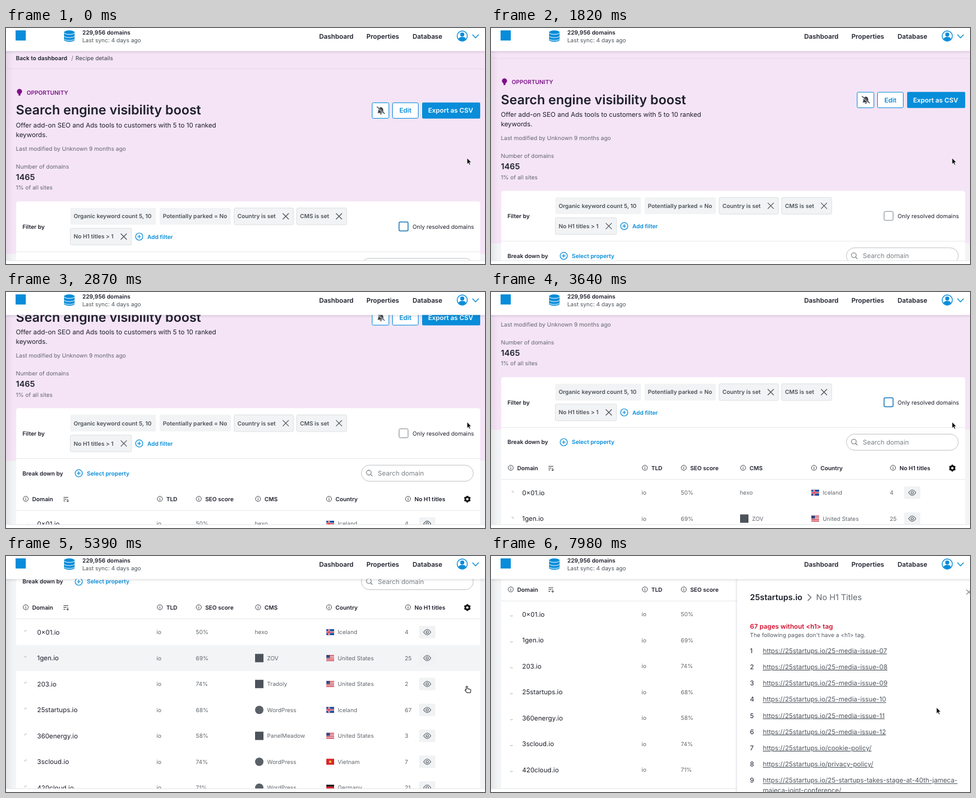
Recreate the animation shown at these times as an HTML page. Size 800 by 396 pixels, loop 8000 ms.

```html
<!DOCTYPE html>
<html lang="en">
<head>
<meta charset="utf-8">
<title>Domain dashboard</title>
<style>
  html, body { margin: 0; width: 100%; height: 100%; overflow: hidden; background: #f3f4f5; }
  svg { display: block; width: 100vw; height: 100vh; }
  text { font-family: Inter, Roboto, sans-serif; font-optical-sizing: none; text-rendering: geometricPrecision; white-space: pre; }
</style>
</head>
<body>
<svg id="stage" viewBox="0 0 800 396"></svg>
<script>
const LOOP = 8000, STEP = 70;
const BLUE = '#078dd9', INK = '#1d1f2b', GRAY = '#62676d', DIM = '#555b62', PURPLE = '#7d0f88';
const SMALL = 9.5, BODY = 10.88, LARGE = 13.55, TITLE = 21.75;
const ROW_TOP = 463, ROW_H = 43.5;

// Text is placed by the vertical middle of its capitals.
const text = (x, y, s, { size = SMALL, fill = INK, bold = false, extra = '' } = {}) =>
  `<text x="${x}" y="${y + size * 0.364}" font-size="${size}" fill="${fill}" font-weight="${bold ? 600 : 400}" ${extra}>${s}</text>`;
const rect = (x, y, w, h, fill, extra = '') =>
  `<rect x="${x}" y="${y}" width="${w}" height="${h}" fill="${fill}" ${extra}/>`;
const line = (d, stroke, width = 1, extra = '') =>
  `<path d="${d}" fill="none" stroke="${stroke}" stroke-width="${width}" ${extra}/>`;
const circle = (x, y, r, fill, extra = '') =>
  `<circle cx="${x}" cy="${y}" r="${r}" fill="${fill}" ${extra}/>`;
const ring = (x, y, r, stroke, width = 1) =>
  circle(x, y, r, 'none', `stroke="${stroke}" stroke-width="${width}"`);
const at = (x, y, body, id = '') => `<g ${id && `id="${id}"`} transform="translate(${x} ${y})">${body}</g>`;

const cross = (x, y, r = 5, color = '#4d5258') =>
  line(`M${x - r} ${y - r}l${2 * r} ${2 * r}M${x + r} ${y - r}l${-2 * r} ${2 * r}`, color, 1.1);
const plus = (x, y) => ring(x, y, 6, BLUE, 1.2) + line(`M${x - 3} ${y}h6M${x} ${y - 3}v6`, BLUE, 1.2);
const info = (x, y) => ring(x, y, 4.2, '#33373d', 0.9) + line(`M${x} ${y - 2.2}v1M${x} ${y - 0.5}v2.8`, '#33373d', 1);
const chip = (x, y, w, label, closable) =>
  rect(x, y, w, 28, '#f1f3f4', `rx="2" ${closable ? 'stroke="#dde0e3"' : ''}`) +
  text(x + 5.5, y + 14, label, { fill: '#4c5259', bold: true }) +
  (closable ? cross(x + w - 12.8, y + 14) : '');
const eye = (x, y) => rect(x - 13.5, y - 10.5, 27, 21, '#f0f2f4', 'rx="2"') +
  line(`M${x - 6} ${y}q6 -9 12 0q-6 9 -12 0z`, '#5b6168', 1.1) + ring(x, y, 2, '#5b6168', 1.1);

const flags = {
  'Iceland': rect(0, 0, 13, 10, '#174a9c') + line('M0 5h13M4.5 0v10', '#fff', 3) + line('M0 5h13M4.5 0v10', '#d9263a', 1.5),
  'United States': rect(0, 0, 13, 10, '#f6eaec') + line('M0 .7h13M0 3.6h13M0 6.5h13M0 9.3h13', '#cf3a4b', 1.4) + rect(0, 0, 6, 5, '#39477f'),
  'Vietnam': rect(0, 0, 13, 10, '#d8242c') + '<path d="M6.5 2l.8 2h2.1l-1.7 1.3.7 2.2-1.9-1.3-1.9 1.3.7-2.2L3.6 4h2.1z" fill="#ffde2e"/>',
  'Germany': rect(0, 0, 13, 3.4, '#1c1c1c') + rect(0, 3.4, 13, 3.3, '#d8202a') + rect(0, 6.7, 13, 3.3, '#f4c51c')
};
const square = rect(416, -7, 14, 14, '#4d535a');
const disc = circle(423, 0, 7, '#5a6067');
const cmsMarks = { ZOV: square, Tradoly: square, PanelMeadow: square, WordPress: disc };

const rows = [
  ['0×01.io', 50, 'hexo', 'Iceland', 4],
  ['1gen.io', 69, 'ZOV', 'United States', 25],
  ['203.io', 74, 'Tradoly', 'United States', 2],
  ['25startups.io', 68, 'WordPress', 'Iceland', 67],
  ['360energy.io', 58, 'PanelMeadow', 'United States', 3],
  ['3scloud.io', 74, 'WordPress', 'Vietnam', 7],
  ['420cloud.io', 71, 'WordPress', 'Germany', 21]
];

function tableRow([domain, score, cms, country, count], i) {
  const dim = { fill: GRAY };
  return at(0, ROW_TOP + (i + 0.5) * ROW_H,
    `<path class="spinner" d="M0 -3A3 3 0 0 1 3 0" fill="none" stroke="#b3b7bb"/>` +
    text(52, 0, domain, { size: BODY }) +
    text(251.5, 0, 'io', dim) + text(317, 0, score + '%', dim) +
    (cmsMarks[cms] || '') + text(cmsMarks[cms] ? 436 : 415.5, 0, cms, dim) +
    at(535, -5, flags[country]) + text(554, 0, country, dim) +
    text(666, 0, count, dim) + eye(703.5, 0));
}

function header() {
  const nav = { size: BODY, bold: true };
  return rect(0, -10, 800, 48.5, '#fff', 'filter="url(#soft)"') +
    rect(16, 4, 17, 17, BLUE) +
    `<path d="M97 7v13c0 4 17.500 4 17.500 0V7z" fill="${BLUE}"/><ellipse cx="105.750" cy="7" rx="8.750" ry="3" fill="${BLUE}"/>` +
    line('M97 8c1 3.500 16.500 3.500 17.500 0M97 13.500c1 3.500 16.500 3.500 17.500 0M97 18.500c1 3 16.500 3 17.500 0', '#fff', 1) +
    text(127.5, 7.3, '229,956 domains', { bold: true }) +
    text(127.5, 20.8, 'Last sync: 4 days ago', { fill: '#4d5359' }) +
    text(523, 14, 'Dashboard', nav) + text(602, 14, 'Properties', nav) + text(679, 14, 'Database', nav) +
    ring(762, 13.5, 8.5, BLUE, 1.4) + circle(762, 11, 3.4, BLUE) +
    `<path d="M756 19q0 -4 6 -4t6 4q-6 5 -12 0z" fill="${BLUE}"/>` +
    line('M779 11l5.200 5.500 5.200 -5.500', BLUE, 1.3);
}

function intro() {
  const outlined = `rx="2" stroke="${BLUE}"`;
  return rect(0, -60, 800, 439, '#f5e4f6') + line('M0 68.500H800', '#e9d8eb') +
    text(16.5, 50.7, 'Back to dashboard', { bold: true }) + text(109, 50.7, '/', { fill: GRAY }) + text(116, 50.7, 'Recipe details', { fill: '#3b3f48' }) +
    circle(22.5, 106.5, 4.3, PURPLE) + rect(20.8, 109, 3.4, 4.5, PURPLE, 'rx="1"') +
    text(34.5, 108.3, 'OPPORTUNITY', { fill: PURPLE, bold: true }) +
    text(16.5, 137.5, 'Search engine visibility boost', { size: TITLE, bold: true }) +
    text(16.5, 162.7, 'Offer add-on SEO and Ads tools to customers with 5 to 10 ranked', { size: BODY }) +
    text(16.5, 179.2, 'keywords.', { size: BODY }) +
    text(16.5, 202.5, 'Last modified by Unknown 9 months ago', { fill: GRAY }) +
    text(16.5, 232.3, 'Number of domains', { fill: GRAY }) +
    text(16.5, 250, '1465', { size: LARGE, bold: true }) +
    text(16.5, 268, '1% of all sites', { fill: GRAY }) +
    rect(611.5, 125.5, 28, 26, '#fff', outlined) +
    '<path d="M620.500 142.500q1.500 -2 1.500 -5c0 -6 8 -6 8 0q0 3 1.500 5zM624 143.500h4q-2 3 -4 0z" fill="#3b4047"/>' +
    line('M619 132l14 12.500', '#fff', 2.4) + line('M619.500 132l13 12', '#3b4047', 1.3) +
    rect(645.5, 125.5, 43, 26, '#fff', outlined) + text(657, 138.5, 'Edit', { size: BODY, fill: BLUE, bold: true }) +
    rect(695, 125, 97, 27, BLUE, 'rx="2"') + text(705, 138.5, 'Export as CSV', { size: BODY, fill: '#fff', bold: true });
}

function filters() {
  return rect(17, 291, 775, 600, '#fff', 'rx="4"') +
    text(27.5, 333.3, 'Filter by', { bold: true }) +
    chip(107.5, 302, 143, 'Organic keyword count 5, 10') + chip(256.5, 302, 119, 'Potentially parked = No') +
    chip(381, 302, 99, 'Country is set', true) + chip(485.5, 302, 83.5, 'CMS is set', true) +
    chip(107.5, 336, 102, 'No H1 titles &gt; 1', true) +
    plus(222.5, 350) + text(236, 350.3, 'Add filter', { fill: BLUE, bold: true }) +
    rect(656.5, 325.5, 15, 15, '#fff', 'id="checkbox" rx="2"') + text(679, 333.2, 'Only resolved domains') +
    line('M17 375.500H792', '#e6e9eb') +
    text(27.5, 400, 'Break down by', { bold: true }) +
    plus(121.5, 400) + text(135, 400, 'Select property', { fill: BLUE, bold: true }) +
    rect(593.5, 386.5, 187, 27, '#fff', 'rx="13.500" stroke="#bfc3c7"') +
    ring(606, 399, 4, '#70767c', 1.1) + line('M609 402l3 3', '#70767c', 1.1) +
    text(621, 400, 'Search domain', { size: BODY, fill: '#7b8186' });
}

function table() {
  const columns = [[33, 'Domain'], [257, 'TLD'], [322, 'SEO score'], [421, 'CMS'], [539.5, 'Country'], [671.5, 'No H1 titles']];
  return rect(17, 0, 775, ROW_H, '#f2f4f6', 'id="hover"') +
    columns.map(([x, label]) => info(x, 443) + text(x + 10.7, 443.7, label, { bold: true })).join('') +
    line('M96 440.500h8M96 443.500h5M96 446.500h3M103 443v5M101 446l2 2 2 -2', '#33373d') +
    circle(770.5, 443.5, 4.8, '#111') +
    line('M770.500 437.800v11.400M765.600 440.600l9.800 5.800M775.400 440.600l-9.800 5.800', '#111', 2.6) + circle(770.5, 443.5, 2, '#fff') +
    line(`M17 ${ROW_TOP - 0.5}H792`, '#e6e8ea') +
    rows.map(tableRow).join('');
}

function panel() {
  const site = 'https://25startups.io/';
  const pages = [7, 8, 9, 10, 11, 12].map(n => '25-media-issue-' + String(n).padStart(2, '0'));
  pages.push('cookie-policy/', 'privacy-policy/', '25-startups-takes-stage-at-40th-jameca-');
  const link = (y, s) => text(454, y, s, { size: BODY, fill: '#4f555c', extra: 'text-decoration="underline"' });
  return rect(411, 36, 420, 380, '#fff', 'filter="url(#soft)"') +
    text(432.5, 69.2, '25startups.io', { size: LARGE, bold: true }) +
    line('M529 64l5.500 5.500 -5.500 5.500', '#5d6369', 1.3) +
    text(543, 69.2, 'No H1 Titles', { size: LARGE, fill: GRAY }) + cross(798, 60.5, 4.2, '#777c81') +
    text(432.5, 118, '67 pages without &lt;h1&gt; tag', { size: BODY, fill: '#cf0f2d', bold: true }) +
    text(432.5, 132.8, "The following pages don't have a &lt;h1&gt; tag.", { fill: DIM }) +
    pages.map((page, i) => text(432.5, 158.8 + i * 27.2, i + 1, { size: BODY }) + link(158.8 + i * 27.2, site + page)).join('') +
    link(393.2, 'majeca-joint-conference/');
}

const arrow = '<path id="arrow" d="M0 0V10.500L2.400 8.400 4 12 5.800 11.200 4.200 7.700H7.300Z" fill="#0b0b0b" stroke="#fff" stroke-width=".800"/>';
const hand = '<path id="hand" d="M-1.500 1.200q1.300 -1.400 2.300 0V4.500l4.600 1.200q1.200 .500 .900 2.200L5.500 11.500H0L-3.200 7.500q-.500 -1.800 1.700 -.800z" fill="#fff" stroke="#222" stroke-width="1.100"/>';

const stage = document.getElementById('stage');
stage.innerHTML = `<defs>
  <filter id="soft" x="-10%" y="-20%" width="120%" height="150%"><feDropShadow dx="0" dy="1" stdDeviation="2" flood-color="#223" flood-opacity=".2"/></filter>
  <linearGradient id="edge"><stop stop-color="#667" stop-opacity=".1"/><stop offset="1" stop-color="#667" stop-opacity="0"/></linearGradient>
  </defs>` + rect(0, 0, 800, 396, '#f3f4f5') +
  at(0, 0, intro() + filters() + table(), 'page') +
  rect(0, 0, 12, 396, 'url(#edge)') +
  rect(0, 391, 800, 5, '#fff') + line('M0 390.500H800', '#e6e8ea') +
  at(0, 0, panel(), 'panel') + at(0, 0, header(), 'header') + at(0, 0, arrow + hand, 'cursor');

const $ = id => document.getElementById(id);
const move = (id, x, y) => $(id).setAttribute('transform', `translate(${x} ${y})`);
const show = (id, on) => $(id).setAttribute('visibility', on ? 'visible' : 'hidden');
const clamp = (v, lo, hi) => Math.min(hi, Math.max(lo, v));
const progress = (t, from, to) => clamp((t - from) / (to - from), 0, 1);
const smooth = p => p * p * (3 - 2 * p);

// Scroll position as [time, offset] pairs.
const scrollKeys = [[0, 0], [480, -9], [1330, -9], [1820, 17.7], [2310, 58], [3640, 148], [5390, 357], [5630, 387]];
function scrollAt(t) {
  const next = scrollKeys.findIndex(([time]) => time > t);
  if (next < 0) return scrollKeys.at(-1)[1];
  if (next === 0) return scrollKeys[0][1];
  const [t0, y0] = scrollKeys[next - 1], [t1, y1] = scrollKeys[next];
  return y0 + (y1 - y0) * (t - t0) / (t1 - t0);
}

function render(t) {
  const scroll = scrollAt(t);
  move('page', 0, -scroll);
  move('header', 0, clamp(-scroll - 6, 0, 3));

  const open = 1 - (1 - progress(t, 7210, 7560)) ** 3;
  move('panel', 400 * (1 - open), 0);
  show('panel', open > 0);

  const toEye = smooth(progress(t, 5740, 6330)), away = smooth(progress(t, 7450, 7850));
  const x = 770 - 67 * toEye + 41 * away, y = 218 + 6 * toEye + 30 * away;
  move('cursor', x, y);
  const pointing = y + scroll > ROW_TOP && open < 0.5;
  show('hand', pointing);
  show('arrow', !pointing);

  // The highlight trails behind the scrolling.
  const row = Math.floor((219 + scrollAt(Math.max(0, t - 450)) - ROW_TOP) / ROW_H);
  show('hover', row >= 0 && open < 0.5);
  $('hover').setAttribute('y', ROW_TOP + row * ROW_H);

  const focused = t < 350 || (t > 3300 && t < 4200);
  $('checkbox').setAttribute('stroke', focused ? '#1b78b8' : '#7d858c');
  $('checkbox').setAttribute('stroke-width', focused ? 1.5 : 1);

  const angle = t * 0.36 + 140;
  for (const spinner of document.querySelectorAll('.spinner'))
    spinner.setAttribute('transform', `translate(34 0) rotate(${angle % 360})`);
}

function tick() {
  const t = performance.now() % LOOP;
  render(Math.floor(t / STEP) * STEP);
  requestAnimationFrame(tick);
}
tick();
</script>
</body>
</html>
```
